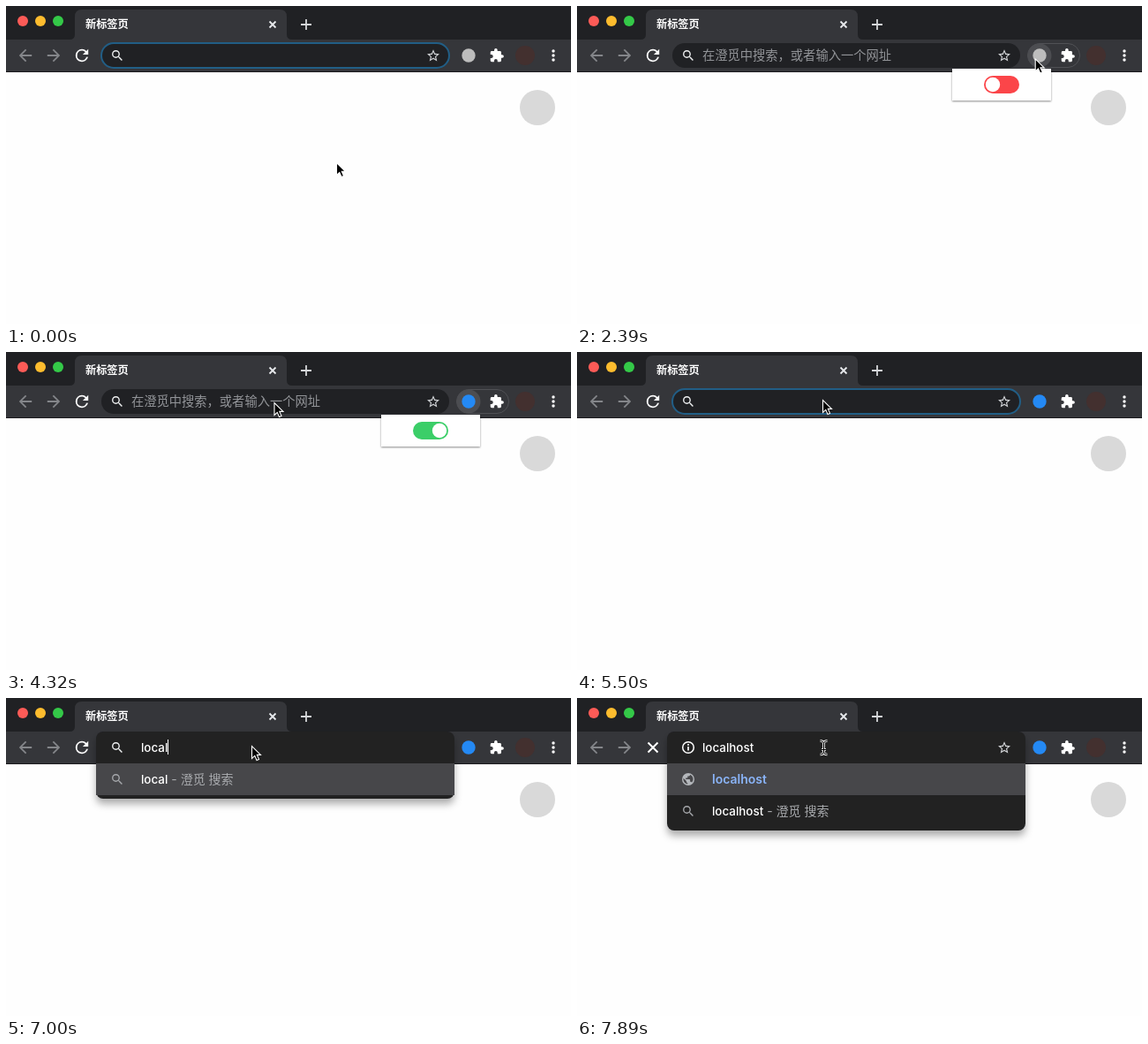
Animation, 640 px wide and 360 px high, one loop 8 s. Source, as an HTML page:

```html
<!DOCTYPE html>
<html lang="zh">
<head>
<meta charset="utf-8">
<style>
html, body { margin: 0; width: 100%; height: 100%; overflow: hidden; background: #fefefe; }
svg { display: block; width: 640px; height: 360px; }
text { font-family: Inter, "Noto Sans CJK SC", "Noto Sans CJK", sans-serif; white-space: pre; }
.typed { font-size: 13.4px; font-weight: 500; fill: #fff; }
.hint { font-size: 14px; font-weight: 400; fill: #a9abae; }
</style>
</head>
<body>
<svg viewBox="0 0 640 360" xmlns="http://www.w3.org/2000/svg">
  <defs>
    <filter id="drop" x="-10%" y="-10%" width="120%" height="150%">
      <feDropShadow dx="0" dy="6" stdDeviation="4" flood-color="#000" flood-opacity=".32"/>
    </filter>
    <filter id="soft" x="-10%" y="-10%" width="120%" height="140%">
      <feDropShadow dx="0" dy="1" stdDeviation="1" flood-color="#000" flood-opacity=".45"/>
    </filter>
    <path id="back" d="M20 11H7.83l5.59-5.59L12 4l-8 8 8 8 1.41-1.41L7.83 13H20z"/>
    <path id="reload" d="M17.65 6.35A7.96 7.96 0 0 0 12 4a8 8 0 1 0 7.73 10h-2.08A6 6 0 1 1 12 6c1.66 0 3.14.69 4.22 1.78L13 11h7V4z"/>
    <path id="search" d="M15.5 14h-.79l-.28-.27A6.47 6.47 0 0 0 16 9.5 6.5 6.5 0 1 0 9.5 16c1.61 0 3.09-.59 4.23-1.57l.27.28v.79l5 4.99L20.49 19zm-6 0a4.5 4.5 0 1 1 0-9 4.5 4.5 0 0 1 0 9z"/>
    <path id="star" d="M22 9.24l-7.19-.62L12 2 9.19 8.63 2 9.24l5.46 4.73L5.82 21 12 17.27 18.18 21l-1.63-7.03zM12 15.4l-3.76 2.27 1-4.28-3.32-2.88 4.38-.38L12 6.1l1.71 4.04 4.38.38-3.32 2.88 1 4.28z"/>
    <path id="puzzle" d="M20.5 11H19V7c0-1.1-.9-2-2-2h-4V3.5a2.5 2.5 0 0 0-5 0V5H4c-1.1 0-2 .9-2 2v3.8h1.5a2.7 2.7 0 0 1 0 5.4H2V20c0 1.1.9 2 2 2h3.8v-1.5a2.7 2.7 0 0 1 5.4 0V22H17c1.1 0 2-.9 2-2v-4h1.5a2.5 2.5 0 0 0 0-5z"/>
    <path id="globe" d="M12 2a10 10 0 1 0 0 20 10 10 0 0 0 0-20zm-1 17.93A8 8 0 0 1 4.21 10.210L9 15v1c0 1.100.9 2 2 2zm6.900-2.540A2 2 0 0 0 16 16h-1v-3c0-.55-.45-1-1-1H8v-2h2c.55 0 1-.45 1-1V7h2c1.100 0 2-.9 2-2v-.41a8 8 0 0 1 2.900 12.800z"/>
  </defs>

  <rect width="640" height="360" fill="#fefefe"/>
  <rect width="640" height="38" fill="#202124"/>
  <rect y="38" width="640" height="36" fill="#35363a"/>
  <rect y="74" width="640" height="1" fill="#1b1b1e"/>
  <circle cx="19" cy="17" r="6" fill="#fc5b57"/>
  <circle cx="39" cy="17" r="6" fill="#fdbc2e"/>
  <circle cx="59" cy="17" r="6" fill="#34c948"/>
  <path d="M72 38q6 0 6-6V12q0-8 8-8H310q8 0 8 8V32q0 6 6 6z" fill="#35363a"/>
  <text x="90" y="25" font-size="12.2" font-weight="700" fill="#fff">新标签页</text>
  <path d="M298.500 17.500l7 7m0-7l-7 7" stroke="#e8eaed" stroke-width="1.8"/>
  <path d="M334 21h12m-6-6v12" stroke="#d5d7da" stroke-width="1.8"/>

  <use href="#back" transform="translate(11.200 45.200) scale(.9)" fill="#84868a"/>
  <use href="#back" transform="translate(64.800 45.200) scale(-.9 .9)" fill="#84868a"/>
  <use id="refresh" href="#reload" transform="translate(75.200 45.200) scale(.9)" fill="#fff"/>
  <path id="stop" d="M80.500 50.500l11 11m0-11l-11 11" stroke="#fff" stroke-width="2"/>

  <g id="pill">
    <rect x="510.500" y="42.500" width="59" height="27" rx="13.500" fill="none" stroke="#505155"/>
    <circle cx="524" cy="56" r="13.500" fill="#4c4d51"/>
  </g>
  <circle id="badge" cx="524" cy="56" r="7.700"/>
  <use href="#puzzle" transform="translate(547.300 47.300) scale(.72)" fill="#fff"/>
  <circle cx="588" cy="56" r="11" fill="#43302f"/>
  <g fill="#fff"><circle cx="620" cy="51" r="1.700"/><circle cx="620" cy="56" r="1.700"/><circle cx="620" cy="61" r="1.700"/></g>
  <circle cx="602" cy="115" r="20" fill="#d9d9d9"/>

  <rect id="box" x="108" y="42" width="394" height="28" rx="14" fill="#202124" stroke="#215e86" stroke-width="2"/>
  <text id="prompt" x="142" y="61" font-size="14.270" fill="#929498">在澄觅中搜索，或者输入一个网址</text>

  <g id="list">
    <rect id="panel" x="102" y="38" width="406" rx="8" fill="#202124" filter="url(#drop)"/>
    <rect x="102" y="74" width="406" height="36" fill="#47474a"/>
    <g id="site">
      <use href="#globe" transform="translate(117.600 83.600) scale(.7)" fill="#b4b7bb"/>
      <text x="153" y="97" font-size="14" font-weight="600" fill="#8ab4f8">localhost</text>
    </g>
    <g id="query">
      <use href="#search" transform="translate(118 84) scale(.68)" fill="#a6a8ac"/>
      <text x="153" y="97" class="typed"><tspan id="word"></tspan><tspan class="hint"> - 澄觅 搜索</tspan></text>
    </g>
  </g>
  <use id="lens" href="#search" transform="translate(118 48) scale(.68)" fill="#f1f3f4"/>
  <use id="world" href="#globe" transform="translate(117.600 47.600) scale(.7)" fill="#e8eaed"/>
  <g id="info">
    <circle cx="126" cy="56" r="6.300" fill="none" stroke="#fff" stroke-width="1.500"/>
    <path d="M126 55v4.500M126 52v1.700" stroke="#fff" stroke-width="1.700"/>
  </g>
  <use id="fav" href="#star" transform="translate(475.600 47.800) scale(.7)" fill="#d2d4d7"/>
  <text id="typed" y="61" class="typed"></text>
  <rect id="caret" y="47" width="1" height="17" fill="#fff"/>

  <g id="popup">
    <rect x="425" y="71" width="112" height="36" fill="#fff" filter="url(#soft)"/>
    <rect id="track" x="461" y="79" width="40" height="20" rx="10"/>
    <circle id="knob" cy="89" r="8.200" fill="#fff"/>
  </g>

  <path id="arrow" d="M.5 .5V14.500L3.800 11.400 6 16.500 8.500 15.400 6.300 10.400H10.500z" fill="#000" stroke="#fff" stroke-width="1.100"/>
  <path id="hand" d="M4.500 10.500V2.200q0-1.700 1.400-1.700t1.400 1.700V6.500q1.900-1 2.400.5 1.900-.8 2.400.6 2.400-.6 2.400 1.500V11.500q0 2-1.500 3.500V17.500H6.500V16Q4 13.500 1.300 10.600q-1-1.500.3-2.100 1.200-.4 2.900 2zM7.500 11v3.500M9.500 11v3.500M11.500 11v3.500" fill="#fff" stroke="#000"/>
  <g id="beam" fill="none">
    <path d="M275.500 48.500q4 0 4 3V61q0 3-4 3M283.500 48.500q-4 0-4 3V61q0 3 4 3M277 58.500h5" stroke="#fff" stroke-width="2.600"/>
    <path d="M275.500 48.500q4 0 4 3V61q0 3-4 3M283.500 48.500q-4 0-4 3V61q0 3 4 3M277 58.500h5" stroke="#000"/>
  </g>
</svg>
<script>
const LOOP = 8000, WORD = "localhost";
const $ = id => document.getElementById(id);
const set = (id, attr, value) => $(id).setAttribute(attr, value);
const show = (id, on) => set(id, "visibility", on ? "visible" : "hidden");
const within = (t, a, b) => t >= a && t < b;

// Pointer moves: first and last step time, step count, end point
const START = [374, 177];
const MOVES = [
  [600, 1350, 6, 524, 56],
  [2390, 2980, 5, 473, 89.5],
  [4170, 4170, 1, 222, 52],
  [4320, 4320, 1, 303.5, 57],
  [4620, 4770, 2, 278, 54]
];
const KEYS = [6250, 6400, 6550, 6850, 7000, 7150, 7300, 7450, 7600];

function pointer(t) {
  let [x, y] = START;
  for (const [a, b, n, px, py] of MOVES) {
    if (t < a) break;
    const step = a === b ? n : Math.min(n, 1 + Math.floor((t - a) / (b - a) * (n - 1) + 1e-6));
    const u = step / n, e = u * u * (3 - 2 * u);
    x += (px - x) * e;
    y += (py - y) * e;
  }
  return [x, y];
}

function draw(t) {
  const [x, y] = pointer(t);
  const count = KEYS.filter(k => t >= k).length;
  const word = WORD.slice(0, count);
  const typing = count > 0, full = count === WORD.length, loading = t >= 7890;
  const popup = within(t, 1640, 4920), blurred = popup;
  const hand = within(t, 2690, 4170);

  show("refresh", !loading);
  show("stop", loading);
  show("pill", within(t, 1200, 5060));
  set("badge", "fill", t < 3570 ? "#bdbdbd" : "#2489f4");

  show("box", !typing);
  set("box", "stroke", blurred ? "none" : "#215e86");
  show("prompt", blurred);
  show("popup", popup);
  set("track", "fill", t < 3570 ? "#fb4549" : "#3bce68");
  set("knob", "cx", t < 3570 ? 471 : t < 3720 ? 483 : 491);

  $("list").style.display = typing ? "" : "none";
  set("panel", "height", full ? 112 : 76);
  $("site").style.display = full ? "" : "none";
  set("query", "transform", `translate(0 ${full ? 36 : 0})`);
  $("word").textContent = word;
  $("typed").textContent = word;
  const left = typing && !loading ? 153 : 142;
  set("typed", "x", left);

  show("lens", !full);
  show("world", full && !loading);
  show("info", loading);
  show("fav", !typing || loading);

  const blink = within(t, 150, 600) || within(t, 1200, 1640) ||
    within(t, 4920, 5500) || within(t, 5950, 7890);
  show("caret", blink);
  set("caret", "x", typing ? Math.round(left + $("typed").getComputedTextLength()) : 142);

  show("arrow", !hand && !loading);
  show("hand", hand);
  show("beam", loading);
  set("arrow", "transform", `translate(${x} ${y})`);
  set("hand", "transform", `translate(${x} ${y})`);
}

function tick() {
  draw(performance.now() % LOOP);
  requestAnimationFrame(tick);
}
tick();
</script>
</body>
</html>
```
